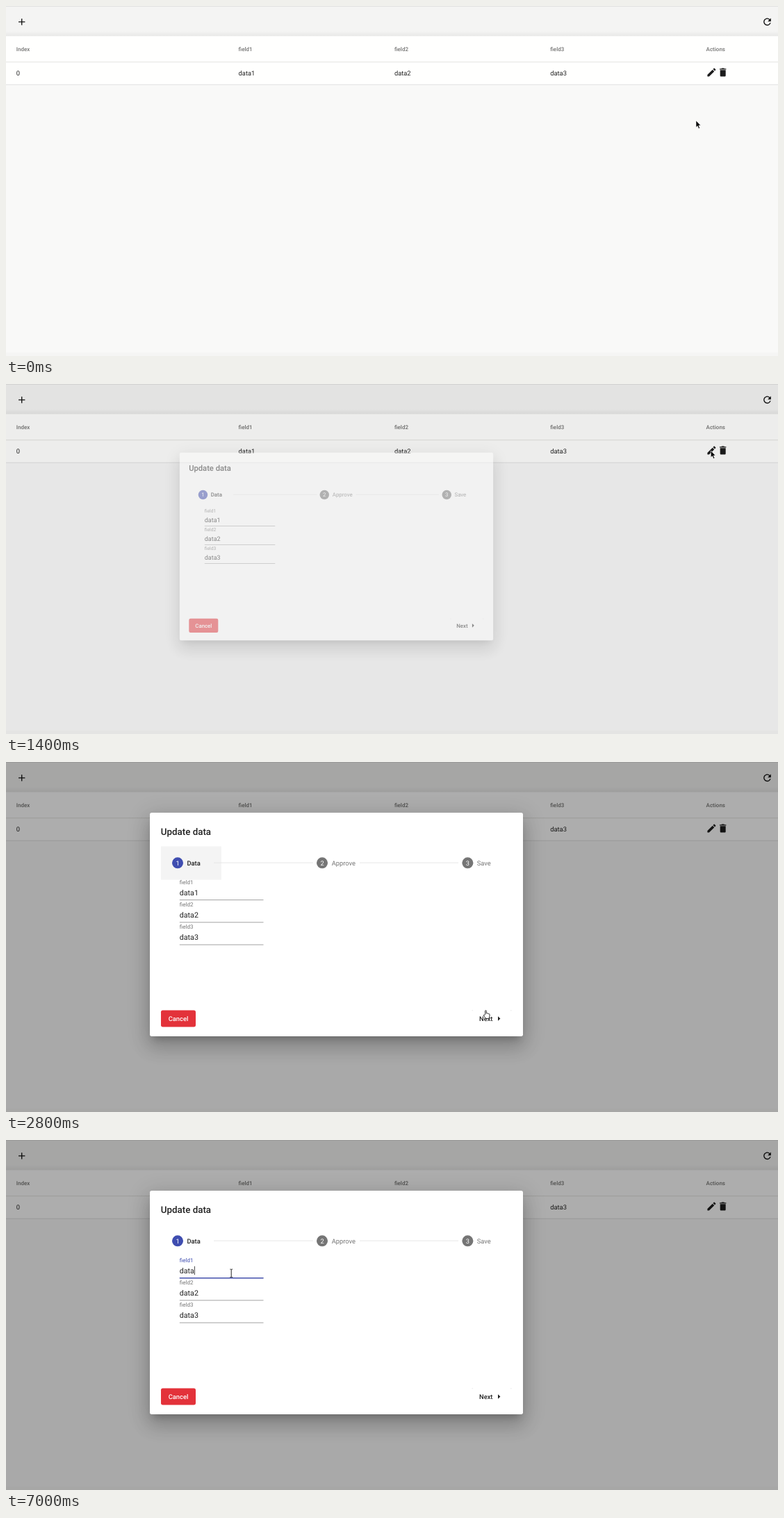
Animation, 1111 px wide and 504 px high, one loop 8 s. Source, as an HTML page:

```html
<!DOCTYPE html>
<html lang="en">
<head>
<meta charset="utf-8">
<title>Update data</title>
<style>
  html, body { margin: 0; width: 100%; height: 100%; overflow: hidden; background: #f9f9f8; }
  body > * { position: absolute; left: 0; top: 0; width: 1111px; height: 504px; }
  svg { display: block; overflow: visible; }
  text { font: 9.333px Roboto, sans-serif; fill: rgba(0,0,0,.87); text-rendering: geometricPrecision; white-space: pre; }
  .bold { font-weight: 500; }
  .head { font-weight: 500; font-size: 8px; fill: rgba(0,0,0,.54); }
  .title { font-weight: 500; font-size: 13.333px; }
  .label { font-size: 8px; fill: rgba(0,0,0,.54); }
  .input { font-size: 10.667px; }
  .soft { fill: rgba(0,0,0,.54); }
  .white { fill: #fff; }
  .mid { text-anchor: middle; }
  #backdrop { background: #000; }
  #dialog {
    left: 207px; top: 72.5px; width: 537px; height: 322px;
    background: #fff; border-radius: 2.67px;
    box-shadow: 0 7.3px 10px -4.7px rgba(0,0,0,.2), 0 16px 25.3px 2px rgba(0,0,0,.14), 0 6px 30.7px 5.3px rgba(0,0,0,.12);
  }
</style>
</head>
<body>
<svg id="page" viewBox="0 0 1111 504">
  <defs>
    <linearGradient id="shade" x2="0" y2="1">
      <stop stop-color="#000" stop-opacity="0"/>
      <stop offset="1" stop-color="#000" stop-opacity=".05"/>
    </linearGradient>
  </defs>
  <rect width="1111" height="504" fill="#f9f9f8"/>
  <rect width="1111" height="43.5" fill="#f4f4f3"/>
  <rect y="36" width="1111" height="7.5" fill="url(#shade)"/>
  <rect width="1111" height="1" fill="#e1e1e0"/>
  <rect y="499" width="1111" height="5" fill="#f5f5f4"/>
  <rect y="43.5" width="1111" height="69.5" fill="#fffffe"/>
  <path d="M0 80.7H1111M0 113.2H1111" stroke="#e0e0df" stroke-width=".9"/>
</svg>
<div id="backdrop"></div>
<div id="dialog">
  <svg id="form" width="537" height="322" viewBox="207 72.5 537 322">
    <rect id="stepFocus" x="223" y="121" width="87" height="48" fill="#f4f4f4"/>
    <path d="M299 144.6H442M509 144.6H651" stroke="#e0e0e0" stroke-width=".8"/>
    <rect x="223" y="357" width="50" height="24" rx="2.67" fill="#e3323a"/>
    <path d="M708 365.7l3.4 3.3-3.4 3.3z" fill="rgba(0,0,0,.87)"/>
    <path d="M670.5 357.3h1.5M726 357.3h1.5" stroke="#ddd" stroke-width=".7"/>
  </svg>
</div>
<svg id="pointer" viewBox="0 0 1111 504">
  <path id="arrow" d="M0 0V9.7L2.2 7.7 3.8 11.5 5.5 10.8 3.9 7.1H6.8Z" fill="#000" stroke="#fff" stroke-width=".6"/>
  <path id="hand" d="M2.6 6.6V1.2Q3.4 0 4.3 1.2V5Q5.2 4.2 6 5.2 7 4.6 7.7 5.7 9 5.4 9 6.8V9L8 12.4H3.4L.4 8Q.4 6.6 1.6 7.2Z" fill="#fff" stroke="#000" stroke-width=".8"/>
  <path id="beam" d="M-1.8-5.7H-.5L0-5.2.5-5.7H1.8M0-5.2V5.2M-1.8 5.7H-.5L0 5.2.5 5.7H1.8" fill="none" stroke="#222" stroke-width="1"/>
</svg>
<script>
const $ = id => document.getElementById(id);
const page = $('page'), form = $('form');

function add(parent, tag, attrs, content = '') {
  const el = document.createElementNS('http://www.w3.org/2000/svg', tag);
  for (const k in attrs) el.setAttribute(k, attrs[k]);
  el.textContent = content;
  return parent.appendChild(el);
}
const text = (parent, x, y, cls, content) => add(parent, 'text', { x, y, class: cls }, content);
const icon = (x, y, d, fill) =>
  add(page, 'path', { d, fill, transform: `translate(${x - 8} ${y - 8}) scale(.6667)` });

// Table page
const columns = [14.7, 334.6, 558.9, 783.2, 1007.6];
['Index', 'field1', 'field2', 'field3', 'Actions'].forEach((s, i) => text(page, columns[i], 65.2, 'head', s));
['0', 'data1', 'data2', 'data3'].forEach((s, i) => text(page, columns[i], 100.2, '', s));
icon(22.7, 22.9, 'M19 13h-6v6h-2v-6H5v-2h6V5h2v6h6v2z', '#111');
icon(1095.5, 22.8, 'M17.65 6.35C16.2 4.9 14.21 4 12 4c-4.42 0-7.99 3.58-7.99 8s3.57 8 7.99 8c3.73 0 6.84-2.55 7.73-6h-2.08c-.82 2.33-3.04 4-5.65 4-3.31 0-6-2.69-6-6s2.69-6 6-6c1.66 0 3.14.69 4.22 1.78L13 11h7V4l-2.35 2.35z', '#111');
icon(1015.4, 95.5, 'M3 17.25V21h3.75L17.81 9.94l-3.75-3.75L3 17.25zM20.71 7.04c.39-.39.39-1.02 0-1.41l-2.34-2.34c-.39-.39-1.02-.39-1.41 0l-1.83 1.83 3.75 3.75 1.83-1.83z', '#1c1c1c');
icon(1031.7, 95.5, 'M6 19c0 1.1.9 2 2 2h8c1.1 0 2-.9 2-2V7H6v12zM19 4h-3.5l-1-1h-5l-1 1H5v2h14V4z', '#1c1c1c');

// Dialog
const blue = '#3f4db0';
text(form, 222.8, 104, 'title', 'Update data');
[['Data', 247, 260.4], ['Approve', 455, 468.7], ['Save', 664.4, 677.8]].forEach(([s, cx, x], i) => {
  add(form, 'circle', { cx, cy: 144.8, r: 8, fill: i ? '#757575' : blue });
  text(form, cx, 148.2, 'white mid', i + 1);
  text(form, x, 148, i ? 'soft' : 'bold', s);
});
const fields = [1, 2, 3].map(n => {
  const dy = (n - 1) * 32.2;
  add(form, 'rect', { x: 249.8, y: 197.8 + dy, width: 120.7, height: .8, fill: '#8c8c8c' });
  return {
    label: text(form, 249.8, 175.3 + dy, 'label', 'field' + n),
    input: text(form, 249.8, 191.5 + dy, 'input', 'data' + n)
  };
});
const underline = add(form, 'rect', { y: 197.6, height: 1.4, fill: blue });
const caret = add(form, 'rect', { y: 181.3, width: .8, height: 12.4, fill: '#222' });
text(form, 248, 372.2, 'bold white mid', 'Cancel');
text(form, 681, 372.2, 'bold', 'Next');

// Pointer stops: time, x, y, shape
const stops = [
  [0, 993, 165, 'arrow'], [100, 999, 142, 'arrow'],
  [300, 1006, 118, 'arrow'], [400, 1010, 101, 'arrow'], [500, 1012, 94.5, 'arrow'],
  [700, 1013, 92, 'arrow'], [800, 1014.3, 96, 'arrow'],
  [2300, 960, 140, 'arrow'], [2400, 840, 235, 'arrow'], [2500, 735, 315, 'arrow'], [2600, 689, 347.5, 'arrow'],
  [2800, 687, 357, 'hand'], [2900, 687, 361.3, 'hand'], [3100, 687, 365, 'hand'], [3500, 672, 361.3, 'hand'],
  [3700, 600, 330, 'arrow'], [3800, 480, 280, 'arrow'], [3900, 391, 238.7, 'arrow'],
  [4000, 350, 215, 'arrow'], [4100, 332, 202, 'arrow'], [4200, 326, 195, 'arrow'],
  [4400, 324.2, 191.8, 'beam']
];
// Dialog opening: time, dialog progress, backdrop opacity
const opening = [[0, 0, 0], [1400, .468, .07], [1500, .885, .205], [1600, 1, .32]];
const latest = (list, t) => list.filter(s => s[0] <= t).pop();
const show = (el, on) => el.style.display = on ? '' : 'none';

function draw(now) {
  const t = Math.floor(now % 8000 / 100) * 100;

  const [, open, dim] = latest(opening, t);
  $('backdrop').style.opacity = dim;
  $('dialog').style.opacity = open;
  $('dialog').style.transform = `scale(${.7 + .3 * open})`;
  $('stepFocus').style.opacity = t < 1600 ? 0 : Math.min(1, Math.max(0, (4500 - t) / 200));

  const focus = Math.min(1, Math.max(0, (t - 4400) / 200));
  const width = 120.7 * (.5 + .5 * focus);
  underline.setAttribute('x', 310.15 - width / 2);
  underline.setAttribute('width', width);
  underline.style.opacity = focus;
  fields[0].label.style.fill = focus ? blue : '';

  const erased = t >= 7000;
  fields[0].input.textContent = erased ? 'data' : 'data1';
  caret.setAttribute('x', erased ? 271.2 : 277.2);
  show(caret, t >= 4600 && t < 5600 || t >= 6800);

  const [, x, y, shape] = latest(stops, t);
  for (const id of ['arrow', 'hand', 'beam']) show($(id), id === shape);
  $(shape).setAttribute('transform', `translate(${x} ${y})`);

  requestAnimationFrame(draw);
}
draw(performance.now());
</script>
</body>
</html>
```
